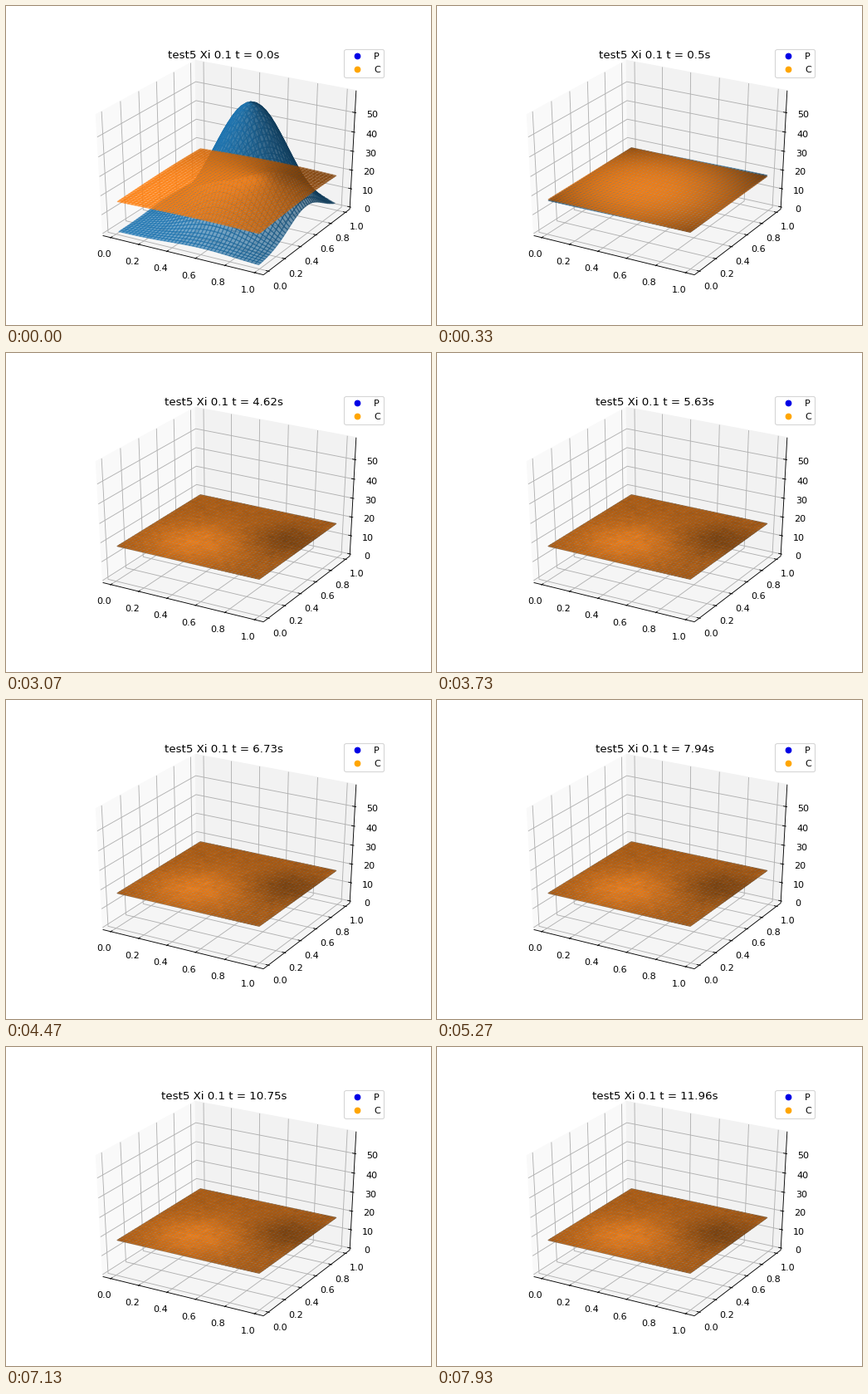
Write a matplotlib script that moves like this. It is 512x384 px and loops after 8000 ms.

```python
import numpy as np
import matplotlib.pyplot as plt
from matplotlib.animation import FuncAnimation
from matplotlib.collections import PolyCollection
from matplotlib.lines import Line2D

FRAMES, INTERVAL = 200, 40   # redrawn 25 times a second
STEPS = 0.6                  # solver steps per redraw, 15 a second
N = 40                       # grid points per side, at cell centres
H = 1 / N
PEAK, WIDTH = 60.0, 0.1      # initial bump of P
DIFF = 0.62
EDGE = 0.5 + 1 / 48          # panes stand a little outside the box
ALPHA = 0.6
BLUE = np.array([31, 119, 180]) / 255
ORANGE = np.array([255, 127, 14]) / 255

# camera basis for elevation 30, azimuth -60
c30 = np.sqrt(3) / 2
RIGHT = np.array([c30, 0.5, 0])
UP = np.array([-0.25, c30 / 2, c30])
TOWARD = np.array([c30 / 2, -0.75, 0.5])

axis = (np.arange(N) + 0.5) * H
X, Y = np.meshgrid(axis, axis)
mid = (axis[1:] + axis[:-1]) / 2
XC, YC = np.meshgrid(mid, mid)
order = np.argsort((TOWARD[0] * XC + TOWARD[1] * YC).ravel(), kind="stable")

# cosine series of the bump, zero flux at the walls
modes = np.arange(24)
fine = (np.arange(2000) + 0.5) / 2000
bump = np.exp(-(fine - 0.6) ** 2 / WIDTH)
coef = 2 * (np.cos(np.pi * np.outer(modes, fine)) * bump).mean(axis=1)
coef[0] /= 2
BASIS = np.cos(np.pi * np.outer(axis, modes))
MEAN = PEAK * coef[0] ** 2
C_START = 15 + 3.8 * np.exp(-((X - 0.65) ** 2 + (Y - 0.7) ** 2) / 0.7)

# slope left over when the surfaces have settled
rng = np.random.default_rng(5)
REST = 4e-8 * (np.exp(-((XC - 0.4) ** 2 + (YC - 0.3) ** 2) / 0.1)
               - 0.8 * np.exp(-((XC - 0.85) ** 2 + (YC - 0.6) ** 2) / 0.06)
               + 0.08 * rng.standard_normal(XC.shape))


def surfaces(t):
    f = BASIS @ (coef * np.exp(-DIFF * (np.pi * modes) ** 2 * t))
    p = PEAK * np.outer(f, f)
    fade = np.exp(-8 * t)
    c = MEAN + (C_START - MEAN) * fade + 0.15 * (p - MEAN) * (1 - fade)
    return p, c


P_START = surfaces(0)[0]
Z_LOW, Z_HIGH = P_START.min(), P_START.max()


def project(q):
    """Perspective projection of points in a unit box centred on zero."""
    q = np.asarray(q, float)
    depth = 10 - q @ TOWARD
    return np.stack([q @ RIGHT / depth, q @ UP / depth], axis=-1)


def flat(v):
    return (v - 0.5) / (1.1 * (1 - H))


def tall(z):
    return (z - Z_LOW) / (Z_HIGH - Z_LOW) - 0.5


fig = plt.figure(figsize=(6.4, 4.8), dpi=80, facecolor="white")
ax = fig.add_axes([0.125, 0.11, 0.775, 0.77])
ax.set_xlim(-0.095, 0.09)
ax.set_ylim(-0.095, 0.09)
ax.set_axis_off()


def line(points, color, z):
    p = project(points)
    ax.plot(p[:, 0], p[:, 1], color=color, lw=0.8, zorder=z, clip_on=False,
            solid_capstyle="butt")


def label(q, text):
    x, y = project(q)
    ax.text(x, y, text, fontsize=10, ha="center", va="top")


def draw_box():
    e = EDGE
    panes = [
        ([(-e, -e, -e), (-e, e, -e), (-e, e, e), (-e, -e, e)], "#f9f9f9"),
        ([(-e, e, -e), (e, e, -e), (e, e, e), (-e, e, e)], "#f2f2f2"),
        ([(-e, -e, -e), (e, -e, -e), (e, e, -e), (-e, e, -e)], "#f5f5f5"),
    ]
    for corners, color in panes:
        ax.add_patch(plt.Polygon(project(corners), fc=color, ec=color,
                                 lw=1, zorder=0, clip_on=False))

    far = e + 11.5 * 0.077 / 12
    out, inn = e + 0.1 / 12, e - 0.2 / 12
    grid = "#b0b0b0"
    for v in np.arange(6) / 5:
        b = flat(v)
        line([(b, -e, -e), (b, e, -e), (b, e, e)], grid, 1)
        line([(e, b, -e), (-e, b, -e), (-e, b, e)], grid, 1)
        line([(b, -out, -e), (b, -inn, -e)], "k", 2)
        line([(out, b, -e), (inn, b, -e)], "k", 2)
        label((b, -far, -far), f"{v:.1f}")
        label((far, b, -far), f"{v:.1f}")
    for v in range(0, 60, 10):
        b = tall(v)
        line([(-e, -e, b), (-e, e, b), (e, e, b)], grid, 1)
        line([(out, e, b), (inn, e, b)], "k", 2)
        label((far, far, b), str(v))
    line([(-e, -e, -e), (e, -e, -e)], "k", 2)
    line([(e, -e, -e), (e, e, -e)], "k", 2)
    line([(e, e, -e), (e, e, e)], "k", 2)


draw_box()


def quads(z):
    s = project(np.stack([flat(X), flat(Y), tall(z)], axis=-1))
    cells = np.stack([s[:-1, :-1], s[:-1, 1:], s[1:, 1:], s[1:, :-1]], axis=2)
    return cells.reshape(-1, 4, 2)[order]


def shades(z, color):
    gx = np.diff(z, axis=1) / H
    gy = np.diff(z, axis=0) / H
    gx = (gx[1:] + gx[:-1]) / 2
    gy = (gy[:, 1:] + gy[:, :-1]) / 2
    light = (gx + gy + 0.5) / np.sqrt(1 + gx ** 2 + gy ** 2) + REST
    light = (light - light.min()) / (light.max() - light.min())
    rgba = np.full((light.size, 4), ALPHA)
    rgba[:, :3] = (0.5 + 0.5 * light.ravel()[order, None]) * color
    return rgba


def mesh(z):
    m = PolyCollection([], linewidths=1, edgecolors="face", zorder=z,
                       clip_on=False)
    ax.add_collection(m, autolim=False)
    return m


mesh_p, mesh_c = mesh(3), mesh(4)
title = ax.set_title("", fontsize=12, y=0.92)
dots = [Line2D([], [], ls="none", marker="o", color=c)
        for c in ("#0000e6", "#ffa500")]
ax.legend(dots, ["P", "C"], loc="upper right", fontsize=10,
          numpoints=1).set_zorder(6)


def update(i):
    t = round(i * STEPS) * 20 / 199
    for m, z, color in zip((mesh_p, mesh_c), surfaces(t), (BLUE, ORANGE)):
        m.set_verts(quads(z))
        m.set_facecolor(shades(z, color))
    title.set_text(f"test5 Xi 0.1 t = {round(t, 2)}s")
    return mesh_p, mesh_c, title


anim = FuncAnimation(fig, update, frames=FRAMES, interval=INTERVAL,
                     repeat=True, repeat_delay=0, blit=False)
plt.show()
```
